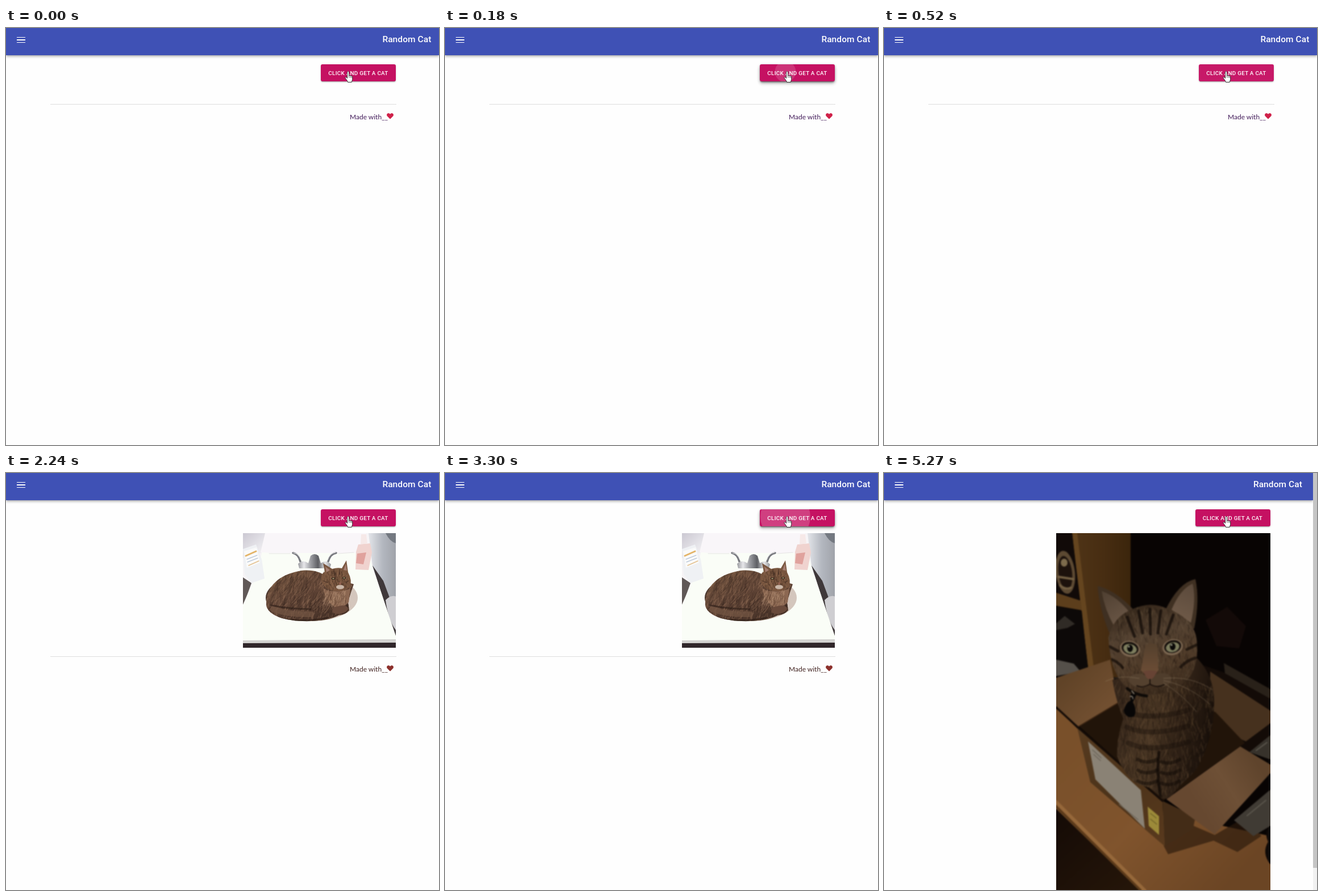
These frames come from a looping animation (762x735 px, 5.73 s). An HTML page with a canvas:

```html
<!DOCTYPE html>
<html lang="en">
<head>
<meta charset="utf-8">
<title>Random Cat</title>
<style>
  html, body { margin: 0; width: 100%; height: 100%; overflow: hidden; background: #fefefe; }
  #stage { position: absolute; left: 0; top: 0; width: 762px; height: 735px; overflow: hidden; }
  #stage * { position: absolute; box-sizing: border-box; white-space: nowrap; }
  canvas { left: 0; top: 0; }
  #bar {
    left: 0; top: 0; width: 100%; height: 48px; background: #3f51b5;
    box-shadow: 0 1.5px 3px -.75px rgba(0,0,0,.2), 0 3px 3.75px rgba(0,0,0,.14), 0 .75px 7.5px rgba(0,0,0,.12);
  }
  #bar i { left: 18.5px; width: 15.5px; height: 1.6px; background: #fff; }
  #title {
    left: 662.4px; top: 10px; color: #fff;
    font: 500 15.5px/21px Roboto, sans-serif; letter-spacing: .08px;
  }
  #button { left: 554px; top: 64px; width: 132px; height: 30px; }
  #button > * { inset: 0; border-radius: 3px; }
  #face {
    background: #c51162; overflow: hidden;
    box-shadow: 0 2.25px .75px -1.5px rgba(0,0,0,.2), 0 1.5px 1.5px rgba(0,0,0,.14), 0 .75px 3.75px rgba(0,0,0,.12);
  }
  #lift { box-shadow: 0 3.75px 3.75px -2.25px rgba(0,0,0,.3), 0 4px 6px rgba(0,0,0,.22), 0 2px 6px rgba(0,0,0,.15); }
  #ripple { left: -45px; top: -77px; width: 180px; height: 180px; border-radius: 50%; background: #fff; }
  #label { color: #fff; text-align: center; font: 500 9.85px/31px Roboto, sans-serif; letter-spacing: .28px; }
  #foot { left: 78px; top: 134px; width: 608.5px; height: 40px; border-top: 1px solid #dedede; }
  #made { left: 527px; top: 13px; font: 400 12px/17px Lato, sans-serif; }
  #heart { left: 592px; top: 15px; }
  #dot { left: 589.5px; top: 66px; width: 20px; height: 20px; border-radius: 50%; background: #e28a2b; opacity: .93; }
  #hand { left: 595.5px; top: 76px; }
  #scroll { left: 755px; top: 0; width: 7px; height: 735px; background: #f1f1f1; }
  #scroll i { left: 0; top: 0; width: 7px; height: 696px; background: #c5c5c5; }
</style>
</head>
<body>
<div id="stage">
  <canvas id="sinkCat" width="762" height="735"></canvas>
  <div id="foot">
    <span id="made">Made with__</span>
    <svg id="heart" width="12" height="11" viewBox="0 0 12 11"><path fill="currentColor" d="M6 10.6L1 5.6C-.7 3.7 0 .9 2.4.3C4 0 5.2.7 6 1.8C6.8.7 8 0 9.6.3C12 .9 12.7 3.7 11 5.6Z"/></svg>
  </div>
  <canvas id="boxCat" width="762" height="735"></canvas>
  <div id="bar">
    <i style="top:15.8px"></i><i style="top:20.2px"></i><i style="top:24.6px"></i>
    <span id="title">Random Cat</span>
  </div>
  <div id="button">
    <div id="lift"></div>
    <div id="face"><div id="ripple"></div></div>
    <div id="label">CLICK AND GET A CAT</div>
  </div>
  <div id="dot"></div>
  <svg id="hand" width="17" height="22" viewBox="0 0 17 22">
    <path fill="#fff" stroke="#222" stroke-width=".9" stroke-linejoin="round" d="M4.6 2.2c0-2 3-2 3 0v6c.3-1.2 2.2-1 2.4.3c.5-.9 2-.6 2.1.6c.6-.6 1.6-.2 1.6 1v4.4c0 2-1.3 3-1.5 5H5.6c-.3-2-2.2-3.8-4.3-7.1c-.9-1.5.8-2.3 1.8-1.4l1.5 1.5z"/>
    <path fill="none" stroke="#333" stroke-width=".7" d="M7.6 8v3.6M10 9v2.8M12.1 9.6v2.4"/>
  </svg>
  <div id="scroll"><i></i></div>
</div>
<script>
const $ = id => document.getElementById(id);
const LOOP = 5730, FIRST = 2240, SECOND = 5270;
const CLICKS = [
  { down: 50, end: FIRST, steps: [70, 140, 180, 270, 350, 440, 520] },
  { down: 3100, end: SECOND, steps: [3150, 3220, 3290, 3380, 3460, 3550] }
];

function seeded(seed) {
  return () => (seed = seed * 16807 % 2147483647) / 2147483647;
}

function painter(id) {
  const c = $(id).getContext('2d');
  return {
    fill(color, d) { c.fillStyle = color; c.fill(new Path2D(d)); },
    line(color, width, d) {
      c.strokeStyle = color; c.lineWidth = width; c.lineCap = 'round';
      c.stroke(new Path2D(d));
    },
    oval(color, x, y, rx, ry, turn = 0) {
      c.fillStyle = color; c.beginPath();
      c.ellipse(x, y, rx, ry, turn, 0, 7); c.fill();
    },
    blend(x0, y0, x1, y1, ...colors) {
      const g = c.createLinearGradient(x0, y0, x1, y1);
      colors.forEach((k, i) => g.addColorStop(i / (colors.length - 1), k));
      return g;
    },
    clip(d, draw) { c.save(); c.clip(new Path2D(d)); draw(); c.restore(); },
    soften(radius) {
      c.filter = `blur(${radius}px)`;
      c.drawImage(c.canvas, 0, 0);
      c.filter = 'none';
    },
    // short hairs, mostly following one direction
    fur(seed, n, [x, y, w, h], dir, len, colors) {
      const r = seeded(seed);
      c.lineWidth = 1.4; c.globalAlpha = .28;
      for (let i = 0; i < n; i++) {
        const px = x + r() * w, py = y + r() * h, a = dir + (r() - .5) * .9, l = len * (.5 + r());
        c.strokeStyle = colors[Math.floor(r() * colors.length)];
        c.beginPath(); c.moveTo(px, py);
        c.lineTo(px + Math.cos(a) * l, py + Math.sin(a) * l); c.stroke();
      }
      c.globalAlpha = 1;
    }
  };
}

function paintSinkCat() {
  const p = painter('sinkCat');
  p.clip('M417 106H686V308H417Z', () => {
    p.fill('#f6f4f6', 'M417 106H687V308H417Z');
    p.fill(p.blend(417, 106, 450, 140, '#cbc8d2', '#f0eff2'), 'M417 106H462L452 140L417 150Z');
    p.fill(p.blend(640, 0, 686, 0, '#dfe1e6', '#b3b7bf', '#a0a3aa'), 'M638 106H687V250L646 172Z');
    p.fill('#747981', 'M668 106H687V124Q676 122 668 106Z');
    p.fill('#3f383a', 'M645 163L664 190L687 252V295Z');
    p.fill('#cfced2', 'M668 224Q678 214 687 218V278Q673 262 668 224Z');
    p.fill('#605857', 'M417 184L432 194L417 236Z');
    p.fill('#fafdf7', 'M452 130L632 121L645 165L687 290V297H417V232L445 168Z');
    p.fill('#f9f6f9', 'M456 106H634L638 135L620 141H470L448 140Z');
    p.line('#e6e4e4', 1, 'M463 142H500M585 142L612 140');
    p.fill('#d3d2d0', 'M417 295L687 293V300H417Z');
    p.fill('#30262a', 'M417 300L687 299V308H417Z');

    p.fill('#eff1f4', 'M417 134L440 126L450 152L455 186L432 194L420 178Z');
    p.fill('#fafafa', 'M419 138L441 131L447 158L424 167Z');
    p.line('#e3b469', 3, 'M422 146L440 138');
    p.line('#a8b9cf', 1.2, 'M424 152L442 145M425 157L443 150');
    p.line('#e3c08d', 1.5, 'M427 163L445 155');

    p.fill('#f0d3cf', 'M620 126L641 124L644 140L638 171L615 170L616 139Z');
    p.fill('#f6e9e8', 'M625 108H634L636 125H624Z');
    p.fill('#e0a29d', 'M618 142L634 140L629 161L616 159Z');

    p.line('#77787e', 3.5, 'M505 141Q514 142 518 156M581 141Q571 142 567 156');
    p.line('#e4e4e6', 1.2, 'M506 141Q515 141 519 153M580 140Q570 141 566 153');
    p.fill(p.blend(512, 0, 574, 0, '#8a8b90', '#e6e6e9', '#9a9ba0', '#5d5e63', '#e4e4e6', '#8a8b90'),
      'M514 160Q522 152 532 159L536 146Q543 140 550 146L554 159Q564 152 572 161L570 168H516Z');

    p.oval(p.blend(458, 0, 620, 0, '#4b372e', '#4b372e', '#6e5649', '#d6c7bc', '#d3c6bd'), 538, 220, 81, 41);
    const body = 'M458 228C459 200 480 180 515 173C536 169 552 174 562 181L612 196C607 211 604 219 602 228L604 242Q597 250 585 251C560 264 506 264 480 254Q456 244 458 228Z';
    p.fill(p.blend(490, 170, 530, 262, '#74553f', '#614536', '#4b352a'), body);
    p.clip(body, () => {
      p.fur(17, 1000, [456, 170, 155, 92], 2, 9, ['#2f211c', '#94705a', '#a07a5e', '#46312a']);
      [480, 503, 528].forEach(x => p.line('rgba(42,28,23,.22)', 6, `M${x} 186q-4 24 -14 44`));
      p.line('rgba(116,86,68,.7)', 10, 'M470 240Q498 250 536 249');
      p.line('rgba(44,29,23,.6)', 3, 'M466 233Q500 240 536 240M480 256Q520 264 566 255');
    });
    p.fill('#8b6751', 'M558 203Q577 214 606 204L603 228Q594 238 578 236Q562 224 558 203Z');
    p.fur(5, 220, [562, 204, 36, 24], 1.8, 9, ['#5b3e30', '#b18b70', '#b8947a']);
    p.oval('#694a3b', 588, 241, 14, 7, -.2);
    p.fill('#79563f', 'M555 188Q555 176 561 174L558 159L574 169Q584 166 591 168L599 154L602 175Q610 190 605 201Q594 210 578 208Q558 204 555 188Z');
    p.fill('#a57f72', 'M562 165L570 171L564 175ZM598 160L600 172L594 171Z');
    p.fur(9, 180, [560, 172, 41, 28], 1.5, 6, ['#35241e', '#a47c62', '#58402f']);
    p.line('rgba(52,35,29,.6)', 1.3, 'M577 170L579 179M587 170L587 179M558 190L566 193M603 190L598 193');
    p.oval('#3b2b20', 576, 186, 3.6, 2);
    p.oval('#3b2b20', 595, 185, 3.2, 2);
    p.oval('#a59a72', 576, 186, 1.8, 1.1);
    p.oval('#a59a72', 595, 185, 1.6, 1.1);
    p.oval('#c9b6a7', 588, 201, 7, 3.8);
    p.fill('#90604f', 'M585 193H591L588 198Z');
    p.soften(.6);
  });
}

function paintBoxCat() {
  const p = painter('boxCat');
  p.clip('M303 106H680V735H303Z', () => {
    p.fill('#080403', 'M303 106H680V735H303Z');
    p.fill('#130a08', 'M566 259L604 236L637 270L625 309L585 305Z');
    p.fill(p.blend(340, 0, 434, 0, '#4e3316', '#472d12', '#3b250c'), 'M333 106H434V360H362Z');
    p.fill('#65451f', 'M331 106H340L370 350H360Z');
    p.fill('#110a08', 'M303 106H331L344 224L303 211Z');
    p.oval('#5c4932', 319, 175, 17, 38, -.12);
    p.oval('#1d120c', 319, 176, 12, 30, -.12);
    p.oval('#7d6b4c', 317, 158, 6, 7);
    p.line('#746043', 4, 'M307 183L333 187M310 198Q319 207 329 202');
    p.fill('#5c3e1c', 'M303 211L346 225L348 242L303 234Z');
    p.fill('#0d0908', 'M303 235L348 243L359 346L303 355Z');
    p.fill('#302b26', 'M303 265L318 252L336 266L323 273L303 277Z');
    p.fill('#55504a', 'M303 329L334 336L346 350L303 358Z');

    p.fill(p.blend(320, 470, 600, 735, '#79502a', '#80542d', '#6b4524'), 'M303 414L494 600L680 640V735H303Z');
    p.fill(p.blend(303, 600, 420, 735, '#150b06', '#241509'), 'M303 592L450 735H303Z');
    p.line('#96683a', 6, 'M301 578L464 741');
    p.line('#5b3a1a', 4, 'M302 587L456 740');
    p.fill('rgba(42,25,12,.65)', 'M492 657L545 622L582 638L640 604L664 640L622 668L580 648L500 672Z');
    p.fill('#130b07', 'M559 338L680 380V468L630 500L530 555Z');
    p.fill('#292119', 'M598 335L680 381V398L600 353Z');
    p.fill('#46311e', 'M574 350L680 419V441L637 473L573 447Z');
    p.fill('#211409', 'M343 446L412 405L583 421L635 476L491 578Z');
    p.fill('#37322b', 'M643 492L680 462V505Z');
    p.fill('#403b34', 'M616 612L680 558V622L650 640Z');
    p.line('#5c574e', 2, 'M655 489L674 475M639 604L672 577');
    p.fill('#0e0907', 'M680 622Q668 632 676 650Q664 670 680 690Z');
    p.fill(p.blend(320, 360, 390, 430, '#604327', '#745132'), 'M303 361L398 329L412 405L342 447L303 412Z');
    p.line('#3d2513', 1.5, 'M342 447L412 405');
    p.fill(p.blend(350, 460, 490, 650, '#553a1f', '#4c331a', '#58391d'), 'M340 449L490 578L494 658L363 545Z');
    p.fill('#432c17', 'M490 578L548 606L544 627L494 658Z');
    p.fill(p.blend(540, 570, 650, 500, '#664830', '#6e5036', '#5f442c'), 'M497 575L627 482L680 514V529L582 637Z');
    p.line('#150c07', 3.5, 'M303 413L342 449L490 578');
    p.fill('#8a8275', 'M359 473L452 559L459 627L372 540Z');
    p.line('#6a6358', 1.5, 'M367 488L382 502M369 496L381 507M414 584L447 611');
    p.fill('#9c8a39', 'M464 588L484 605V638L466 622Z');
    p.line('#6d6026', 1.5, 'M469 600L479 608M469 610L480 619');

    const body = 'M402 365Q409 405 421 433Q409 468 410 499Q424 535 446 548L468 555L490 574Q504 576 514 558L548 525Q582 468 581 402Q580 351 545 321Z';
    p.fill(p.blend(410, 420, 585, 450, '#35261a', '#483523', '#2e2015', '#150d08'), body);
    p.clip(body, () => {
      p.fur(31, 1300, [402, 365, 180, 210], 1.6, 12, ['#120c08', '#685038', '#6b5238', '#241a11']);
      [420, 448, 476].forEach((y, i) =>
        p.line('rgba(15,9,6,.32)', 9, `M${424 + i * 3} ${y}Q468 ${y + 18} 535 ${y - 2}`));
      [505, 524, 543].forEach(y =>
        p.line('rgba(14,8,5,.5)', 6, `M447 ${y}Q463 ${y + 9} 480 ${y}M488 ${y + 4}Q504 ${y + 10} 520 ${y}`));
      p.line('rgba(12,7,4,.7)', 5, 'M484 492Q479 528 487 570');
    });

    p.fill('#3f3022', 'M397 283Q378 237 376 199Q410 208 440 242L450 284Z');
    p.fill('#3f3022', 'M494 244Q518 193 548 187Q556 223 546 274L507 285Z');
    p.fill(p.blend(380, 200, 425, 270, '#4b3c2e', '#6d5948'), 'M383 208Q410 218 430 243L405 270Q388 240 383 208Z');
    p.fill(p.blend(545, 190, 515, 260, '#59483a', '#705b49'), 'M543 195Q550 222 540 264L506 241Q521 205 543 195Z');
    const head = 'M395 289Q404 253 437 240Q470 225 498 239Q539 253 549 286Q556 326 541 355Q521 384 486 389Q451 395 425 376Q397 350 395 289Z';
    p.fill(p.blend(440, 235, 480, 390, '#35271a', '#524030', '#4e3a28', '#3a2a1c'), head);
    p.clip(head, () => {
      p.fur(73, 800, [394, 235, 158, 150], 1.5, 8, ['#150e09', '#75604a', '#2c2016', '#604b38']);
      p.line('rgba(18,11,7,.75)', 5, 'M448 243L455 282M468 240L469 284M487 243L482 282M428 254L441 288M509 250L497 284');
      p.line('rgba(18,11,7,.7)', 5, 'M397 306L412 314M399 328Q411 332 420 343M550 303L533 311M548 326Q533 330 522 342');
    });
    p.fill(p.blend(0, 300, 0, 360, '#54402d', '#6f4f37'), 'M460 304Q470 296 481 304L483 348L468 362L452 348Z');
    p.oval('#54412f', 450, 366, 19, 12, .15);
    p.oval('#4f3d2c', 487, 365, 19, 12, -.15);
    [[433, 309, .25], [508, 306, -.25]].forEach(([x, y, turn]) => {
      p.oval('#7b6650', x, y + 1, 18, 14, turn);
      p.oval('#120d09', x, y, 15, 11, turn);
      p.oval('#7d7d5e', x, y + 1, 12, 8.5, turn);
      p.oval('#0a0907', x, y, 5, 6.5);
      p.oval('#b4b49c', x - 2, y - 3, 1.5, 1.5);
    });
    p.fill('#674334', 'M456 350Q468 346 481 350L474 361Q468 366 462 361Z');
    p.line('#1b110b', 2, 'M468 364V372Q455 380 445 375M468 372Q480 380 493 373');
    p.line('rgba(160,140,112,.5)', .9, 'M492 366Q536 374 574 408M492 362Q540 357 578 382M492 370Q525 390 550 421M449 362Q414 355 390 367');
    p.line('#0e0a07', 5, 'M428 380Q442 391 462 393');
    p.fill('#070606', 'M434 388L444 391L438 404Q446 419 440 429Q426 434 422 419Q425 405 434 401Z');
    p.line('#a89d8e', 1.3, 'M436 384L440 389M433 394Q438 392 438 398');
    p.soften(1);
  });
}

// cubic-bezier(.4, 0, .2, 1), solved by bisection
function ease(x) {
  x = Math.min(1, Math.max(0, x));
  let lo = 0, hi = 1, s = .5;
  for (let i = 0; i < 20; i++) {
    s = (lo + hi) / 2;
    const bx = 1.2 * (1 - s) ** 2 * s + .6 * (1 - s) * s * s + s ** 3;
    if (bx < x) lo = s; else hi = s;
  }
  return 3 * (1 - s) * s * s + s ** 3;
}

function press(click, t) {
  const age = Math.max(...click.steps.filter(s => s <= t)) - click.down;
  const grow = ease(age / 550);
  return {
    scale: grow,
    alpha: (.1 + .2 * grow) * (1 - ease((age - 140) / 550)),
    lift: ease(age / 200) * (1 - ease((age - 140) / 250)),
    dot: t < click.steps[1]
  };
}

function render(t) {
  const sink = t >= FIRST && t < SECOND, box = t >= SECOND;
  const show = (id, on) => $(id).style.visibility = on ? 'visible' : 'hidden';
  show('sinkCat', sink);
  show('boxCat', box);
  show('scroll', box);
  show('foot', !box);
  $('foot').style.top = sink ? '323px' : '134px';
  $('made').style.color = sink ? '#40211f' : '#421b59';
  $('heart').style.color = sink ? '#8c302c' : '#cf2149';
  $('bar').style.width = box ? '755px' : '762px';
  $('title').style.left = box ? '649.9px' : '662.4px';
  $('button').style.left = box ? '547.5px' : '554px';

  const click = CLICKS.find(c => t >= c.steps[0] && t < c.end);
  const state = click ? press(click, t) : { scale: 0, alpha: 0, lift: 0, dot: false };
  $('ripple').style.transform = `scale(${state.scale})`;
  $('ripple').style.opacity = state.alpha;
  $('lift').style.opacity = state.lift;
  show('dot', state.dot);
}

paintSinkCat();
paintBoxCat();
const start = performance.now();
function tick() {
  render((performance.now() - start) % LOOP);
  requestAnimationFrame(tick);
}
tick();
</script>
</body>
</html>
```
